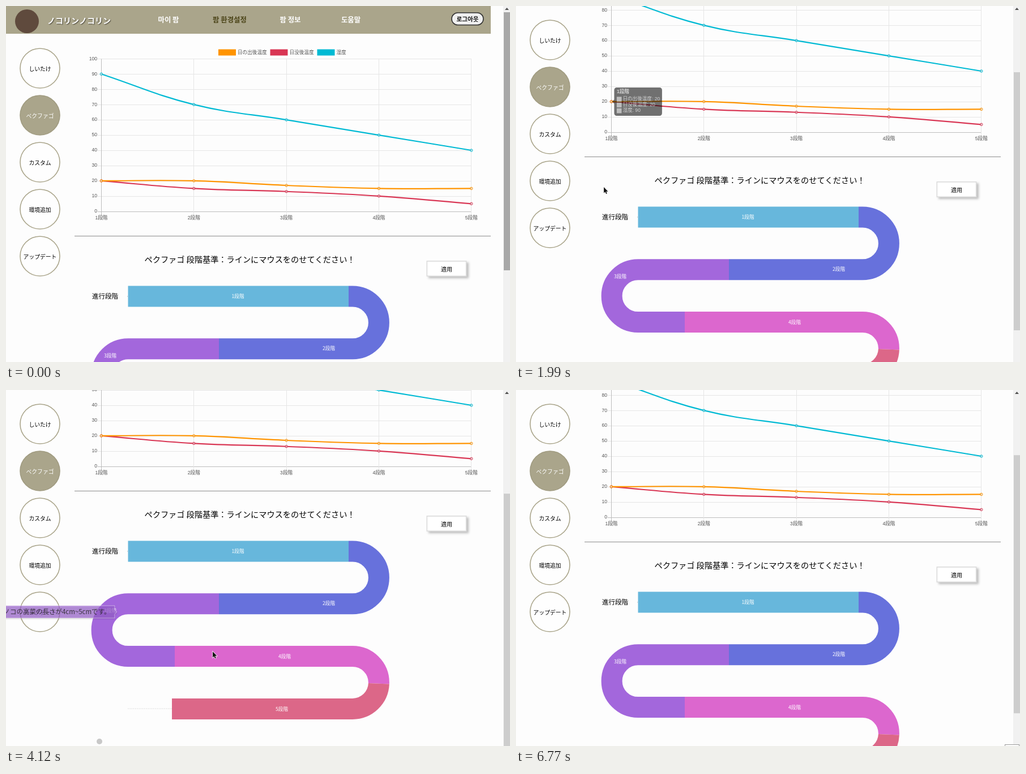
Write an HTML page with a canvas that moves like this. It is 890x629 px and loops after 6.83 s.

```html
<!DOCTYPE html>
<html lang="ja">
<head>
<meta charset="utf-8">
<style>
html, body { margin: 0; width: 890px; height: 629px; overflow: hidden; background: #fdfdfd; }
canvas { display: block; }
</style>
</head>
<body>
<canvas id="stage" width="890" height="629"></canvas>
<script>
const ctx = document.getElementById('stage').getContext('2d');
const LOOP = 6830;
const OLIVE = '#aaa58b';
const JP = '"Noto Sans CJK JP", "Noto Sans CJK", sans-serif';
const KR = '"Noto Sans CJK KR", "Noto Sans CJK", sans-serif';
const LATIN = '"Liberation Sans", "Noto Sans CJK JP", sans-serif';

const clamp = v => Math.max(0, Math.min(1, v));
const lerp = (a, b, p) => a + (b - a) * p;
const mix = (a, b, p) => a.map((v, i) => lerp(v, b[i], p));
const outQuart = p => 1 - (1 - clamp(p)) ** 4;
const outCubic = p => 1 - (1 - clamp(p)) ** 3;

// Piecewise linear track of [time, ...values]
function track(keys, t) {
  let i = keys.findIndex(k => k[0] > t);
  if (i < 0) return keys[keys.length - 1].slice(1);
  if (i === 0) return keys[0].slice(1);
  const a = keys[i - 1], b = keys[i];
  return mix(a, b, (t - a[0]) / (b[0] - a[0])).slice(1);
}

// Eased chase through [time, state] targets, each one starting from the pose reached so far
function chase(keys, t, duration, ease) {
  let pose = keys[0][1];
  for (let i = 1; i < keys.length && keys[i][0] <= t; i++) {
    const end = i + 1 < keys.length ? Math.min(t, keys[i + 1][0]) : t;
    pose = mix(pose, keys[i][1], ease((end - keys[i][0]) / duration));
  }
  return pose;
}

const latest = (keys, t) => keys.filter(k => k[0] <= t).pop() || keys[0];

function text(s, x, y, size, color, align = 'left', weight = 400, family = JP) {
  ctx.font = `${weight} ${size}px ${family}`;
  ctx.textAlign = align;
  ctx.textBaseline = 'middle';
  ctx.fillStyle = color;
  ctx.fillText(s, x, y);
}
function rect(x, y, w, h, color) {
  ctx.fillStyle = color;
  ctx.fillRect(x, y, w, h);
}
function line(x1, y1, x2, y2, color) {
  ctx.strokeStyle = color;
  ctx.lineWidth = 1;
  ctx.beginPath();
  ctx.moveTo(x1, y1);
  ctx.lineTo(x2, y2);
  ctx.stroke();
}
function disc(x, y, r, fill, stroke, width) {
  ctx.beginPath();
  ctx.arc(x, y, r, 0, Math.PI * 2);
  if (fill) { ctx.fillStyle = fill; ctx.fill(); }
  if (stroke) { ctx.strokeStyle = stroke; ctx.lineWidth = width; ctx.stroke(); }
}

const SCROLL = [[1780, 0], [1990, 140], [2120, 190], [2280, 228],
  [5620, 228], [5660, 216], [5800, 160], [5950, 138]];

const POINTER = [[40, 892, 300], [130, 880, 296], [250, 822, 282], [430, 740, 268], [640, 672, 258],
  [740, 577, 254], [860, 498, 253], [1010, 413, 258], [1240, 250, 295], [1360, 216, 306],
  [1650, 156, 320], [2400, 154, 320], [2800, 390, 282], [2980, 424, 302], [3100, 436, 358],
  [3170, 437, 368], [3520, 434, 374], [3750, 376, 380], [3790, 365, 382], [3980, 326, 392],
  [4030, 325, 417], [4090, 357, 452], [4120, 365, 462], [4360, 380, 492], [4630, 402, 542],
  [4720, 420, 556], [4900, 560, 582], [5080, 800, 540], [5170, 882, 520], [5250, 876, 512],
  [5340, 843, 505], [5780, 843, 505], [6040, 852, 590], [6090, 856, 614], [6130, 860, 640]];

// Line chart
const px = i => 168.4 + i * 163.35;
const py = v => 362.8 - v * 2.695;
const SERIES = [
  { name: '日の出後温度', color: '#ff9400', data: [20, 20, 17, 15, 15], legend: 375 },
  { name: '日没後温度', color: '#d93654', data: [20, 15, 13, 10, 5], legend: 466.5 },
  { name: '湿度', color: '#00bad4', data: [90, 70, 60, 50, 40], legend: 549.5 }
];

function drawCurve({ data, color }) {
  const pts = data.map((v, i) => [px(i), py(v)]);
  const ctrl = pts.map((p, i) => {
    const a = pts[i - 1] || p, b = pts[i + 1] || p;
    const d1 = Math.hypot(p[0] - a[0], p[1] - a[1]), d2 = Math.hypot(b[0] - p[0], b[1] - p[1]);
    const f1 = 0.4 * d1 / (d1 + d2), f2 = 0.4 * d2 / (d1 + d2);
    return [p[0] - f1 * (b[0] - a[0]), p[1] - f1 * (b[1] - a[1]),
            p[0] + f2 * (b[0] - a[0]), p[1] + f2 * (b[1] - a[1])];
  });
  ctx.strokeStyle = color;
  ctx.lineWidth = 2.2;
  ctx.beginPath();
  ctx.moveTo(...pts[0]);
  for (let i = 1; i < pts.length; i++) {
    ctx.bezierCurveTo(ctrl[i - 1][2], ctrl[i - 1][3], ctrl[i][0], ctrl[i][1], ...pts[i]);
  }
  ctx.stroke();
  pts.forEach(p => disc(p[0], p[1], 2.2, 'rgba(220,220,220,.5)', color, 1));
}

function drawChart() {
  for (const s of SERIES) {
    rect(s.legend, 76.5, 31, 11, s.color);
    text(s.name, s.legend + 34, 81.5, 8.6, '#555');
  }
  for (let v = 0; v <= 100; v += 10) {
    const y = Math.round(py(v)) + 0.5;
    line(162, y, 822, y, v ? '#e6e6e6' : '#bdbdbd');
    text(v, 161, py(v), 8.6, '#555', 'right', 400, LATIN);
  }
  for (let i = 0; i < 5; i++) {
    const x = Math.floor(px(i)) + 0.5;
    line(x, 93.5, x, 370, i ? '#e6e6e6' : '#bdbdbd');
    text(`${i + 1}段階`, px(i), 374.5, 8.6, '#555', 'center', 400, LATIN);
  }
  [2, 1, 0].forEach(i => drawCurve(SERIES[i]));
}

const TIP_W = 84.5, TIP_H = 50;
const tipPose = (i, v) => [i > 2 ? px(i) - 5 - TIP_W : px(i) + 5, py(v)];
const CHART_TIPS = [[200, 4, 40], [430, 3, 50], [740, 2, 60], [1010, 1, 20], [1240, 0, 20]]
  .map(([t, i, v]) => [t, tipPose(i, v), i]);

function drawChartTip(t) {
  const alpha = Math.min(clamp((t - 200) / 200), 1 - clamp((t - 1930) / 200));
  if (!alpha) return;
  const [x, y] = chase(CHART_TIPS, t, 400, outQuart);
  const index = latest(CHART_TIPS, t)[2];
  const top = y - TIP_H / 2;
  ctx.save();
  ctx.globalAlpha = alpha;
  ctx.fillStyle = 'rgba(0,0,0,.8)';
  ctx.beginPath();
  ctx.roundRect(x, top, TIP_W, TIP_H, 4.3);
  const edge = index > 2 ? x + TIP_W : x, out = index > 2 ? 3.6 : -3.6;
  ctx.moveTo(edge, y - 3.6);
  ctx.lineTo(edge + out, y);
  ctx.lineTo(edge, y + 3.6);
  ctx.fill();
  text(`${index + 1}段階`, x + 4.5, top + 8, 8.6, '#fff', 'left', 700, LATIN);
  SERIES.forEach((s, row) => {
    const ly = top + 20.8 + row * 10.2;
    rect(x + 4.5, ly - 4.3, 8.6, 8.6, '#e0e0e0');
    text(`${s.name}: ${s.data[index]}`, x + 15, ly, 8.6, '#fff', 'left', 500, LATIN);
  });
  ctx.restore();
}

// Serpentine chart
const ROW = [513, 605.8, 698.6, 791.4];
const LEFT = 215.5, RIGHT = 612, BEND = 46.4, Q = Math.PI / 2;
const STAGES = [
  { rgb: [103, 183, 220], label: [409.5, 513], length: '1cm未満' },
  { rgb: [103, 113, 220], label: [570, 605], length: '1cm~2cm' },
  { rgb: [163, 103, 220], label: [184, 617.5], length: '4cm~5cm' },
  { rgb: [220, 103, 206], label: [492, 698.5], length: '6cm~7cm' },
  { rgb: [220, 103, 136], label: [487, 791.5], length: '8cm~9cm' }
];
const BANDS = [
  () => { ctx.moveTo(LEFT, ROW[0]); ctx.lineTo(605, ROW[0]); },
  () => {
    ctx.moveTo(605, ROW[0]);
    ctx.arc(RIGHT, ROW[0] + BEND, BEND, -Q, Q);
    ctx.lineTo(376, ROW[1]);
  },
  () => {
    ctx.moveTo(376, ROW[1]);
    ctx.arc(LEFT, ROW[1] + BEND, BEND, -Q, Q, true);
    ctx.lineTo(298, ROW[2]);
  },
  () => { ctx.moveTo(298, ROW[2]); ctx.arc(RIGHT, ROW[2] + BEND, BEND, -Q, 0.04); },
  () => { ctx.arc(RIGHT, ROW[2] + BEND, BEND, 0.04, Q); ctx.lineTo(293, ROW[3]); }
];

function drawSerpentine() {
  ctx.save();
  ctx.setLineDash([1, 2.2]);
  line(LEFT, 791, 293, 791, '#bbb');
  ctx.restore();
  rect(214, 512.5, 1, 1, '#aaa');
  STAGES.forEach((s, i) => {
    ctx.strokeStyle = `rgb(${s.rgb})`;
    ctx.lineWidth = 37;
    ctx.beginPath();
    BANDS[i]();
    ctx.stroke();
  });
  STAGES.forEach((s, i) => text(`${i + 1}段階`, ...s.label, 8.6, '#fff', 'center'));
  disc(165, 849, 5, '#c8c8c8');
}

const STAGE_TIPS = [2800, 3103, 3750, 4125, 4660].map((t, i) => {
  const { label, rgb } = STAGES[i];
  return [t, [label[0] + 12, label[1] + 2.5, ...rgb], i];
});
const STAGE_ALPHA = [[2800, 0], [2900, 1], [3000, 1], [3100, .6], [3170, .72], [3250, 1], [4030, 1],
  [4120, .7], [4170, .6], [4250, 1], [4360, 1], [4600, 0], [4660, 0], [4750, 1], [4900, 1], [5150, 0]];

function drawStageTip(t) {
  const [alpha] = track(STAGE_ALPHA, t);
  if (!alpha) return;
  const [x, y, ...rgb] = chase(STAGE_TIPS, t, 300, outCubic);
  const index = latest(STAGE_TIPS, t)[2];
  const left = x - 272, right = x - 4;
  ctx.save();
  ctx.globalAlpha = alpha * 0.9;
  ctx.beginPath();
  [[left, y - 11], [right, y - 11], [right, y - 4], [x, y], [right, y + 4], [right, y + 11], [left, y + 11]]
    .forEach(p => ctx.lineTo(...p));
  ctx.closePath();
  ctx.fillStyle = `rgb(${rgb.map(Math.round)})`;
  ctx.shadowColor = 'rgba(0,0,0,.35)';
  ctx.shadowBlur = 3;
  ctx.shadowOffsetY = 1;
  ctx.fill();
  ctx.shadowColor = 'transparent';
  ctx.strokeStyle = 'rgba(255,255,255,.7)';
  ctx.lineWidth = 1;
  ctx.stroke();
  ctx.globalAlpha = Math.min(1, alpha * 1.2);
  text(`${index + 1}段階ではキノコの高菜の長さが${STAGES[index].length}です。`,
    left + 7.5, y, 11.5, index === 1 ? '#fff' : '#222');
  ctx.restore();
}

// Page furniture
function drawHeader() {
  rect(0, 0, 856, 49, OLIVE);
  disc(37, 27, 21, '#5f4a3d');
  ctx.save();
  ctx.shadowColor = '#4a4638';
  ctx.shadowOffsetX = ctx.shadowOffsetY = 1;
  ctx.shadowBlur = 1.5;
  text('ノコリンノコリン', 73, 26, 14, '#fff', 'left', 900);
  ctx.restore();
  [['마이 팜', 287], ['팜 환경설정', 395], ['팜 정보', 502], ['도움말', 609]].forEach(([s, x], i) =>
    text(s, x, 24, 12.4, i === 1 ? '#4b4418' : '#fff', 'center', 700, KR));
  ctx.beginPath();
  ctx.roundRect(787, 12, 56, 21.5, 10.7);
  ctx.fillStyle = '#efefef';
  ctx.fill();
  ctx.strokeStyle = '#333';
  ctx.lineWidth = 1.6;
  ctx.stroke();
  text('로그아웃', 815, 23, 10.6, '#111', 'center', 700, KR);
}

function drawSidebar(shift) {
  ['しいたけ', 'ペクファゴ', 'カスタム', '環境追加', 'アップデート'].forEach((s, i) => {
    const y = 110 + i * 83 - shift, active = i === 1;
    disc(60, y, 35, active ? OLIVE : '#fefefe', active ? '#a09b80' : OLIVE, 1.6);
    text(s, 60, y + 1.2, 9.8, active ? '#fff' : '#000', 'center');
  });
}

function drawGuide() {
  rect(121, 406, 735, 1, '#8c8c8c');
  text('ペクファゴ 段階基準：ラインにマウスをのせてください！', 244.5, 448, 14.2, '#000');
  ctx.save();
  ctx.shadowColor = 'rgba(0,0,0,.25)';
  ctx.shadowBlur = 4;
  ctx.shadowOffsetX = ctx.shadowOffsetY = 3;
  rect(742.5, 450, 71, 28, '#ddd');
  ctx.restore();
  rect(744.2, 451.7, 67.6, 24.6, '#fff');
  text('適用', 778, 465, 10, '#000', 'center', 500);
  text('進行段階', 152, 513, 11.5, '#000');
}

function drawScrollbar(scroll, dark) {
  rect(878, 0, 12, 629, '#f1f1f1');
  ctx.fillStyle = '#505050';
  ctx.beginPath();
  ctx.moveTo(881, 7);
  ctx.lineTo(884.5, 3);
  ctx.lineTo(888, 7);
  ctx.fill();
  rect(879, 11 + scroll * 0.755, 11, 456, dark ? '#a8a8a8' : '#cdcdcd');
}

function drawPointer(x, y) {
  ctx.beginPath();
  [[0, 0], [0, 10.5], [2.4, 8.3], [4, 12], [5.7, 11.3], [4.1, 7.7], [7.4, 7.7]]
    .forEach(p => ctx.lineTo(x + p[0], y + p[1]));
  ctx.closePath();
  ctx.strokeStyle = '#fff';
  ctx.lineWidth = 1.4;
  ctx.stroke();
  ctx.fillStyle = '#111';
  ctx.fill();
}

function draw(now) {
  let t = now % LOOP;
  if (t > 3790 && t < 3980) t = 3790;
  const [scroll] = track(SCROLL, t);
  const [mx, my] = track(POINTER, t);

  rect(0, 0, 890, 629, '#fdfdfd');
  drawSidebar(Math.min(scroll, 50));
  ctx.save();
  ctx.translate(0, -Math.round(scroll));
  drawHeader();
  drawChart();
  drawChartTip(t);
  drawGuide();
  drawSerpentine();
  drawStageTip(t);
  ctx.restore();
  drawScrollbar(scroll, mx > 876);
  if (t >= 6720) {
    rect(863, 626, 26, 3, '#999');
    rect(864, 627, 24, 2, '#fff');
  }
  drawPointer(mx, my);
}

const start = performance.now();
function tick() {
  draw(performance.now() - start);
  requestAnimationFrame(tick);
}
tick();
</script>
</body>
</html>
```
